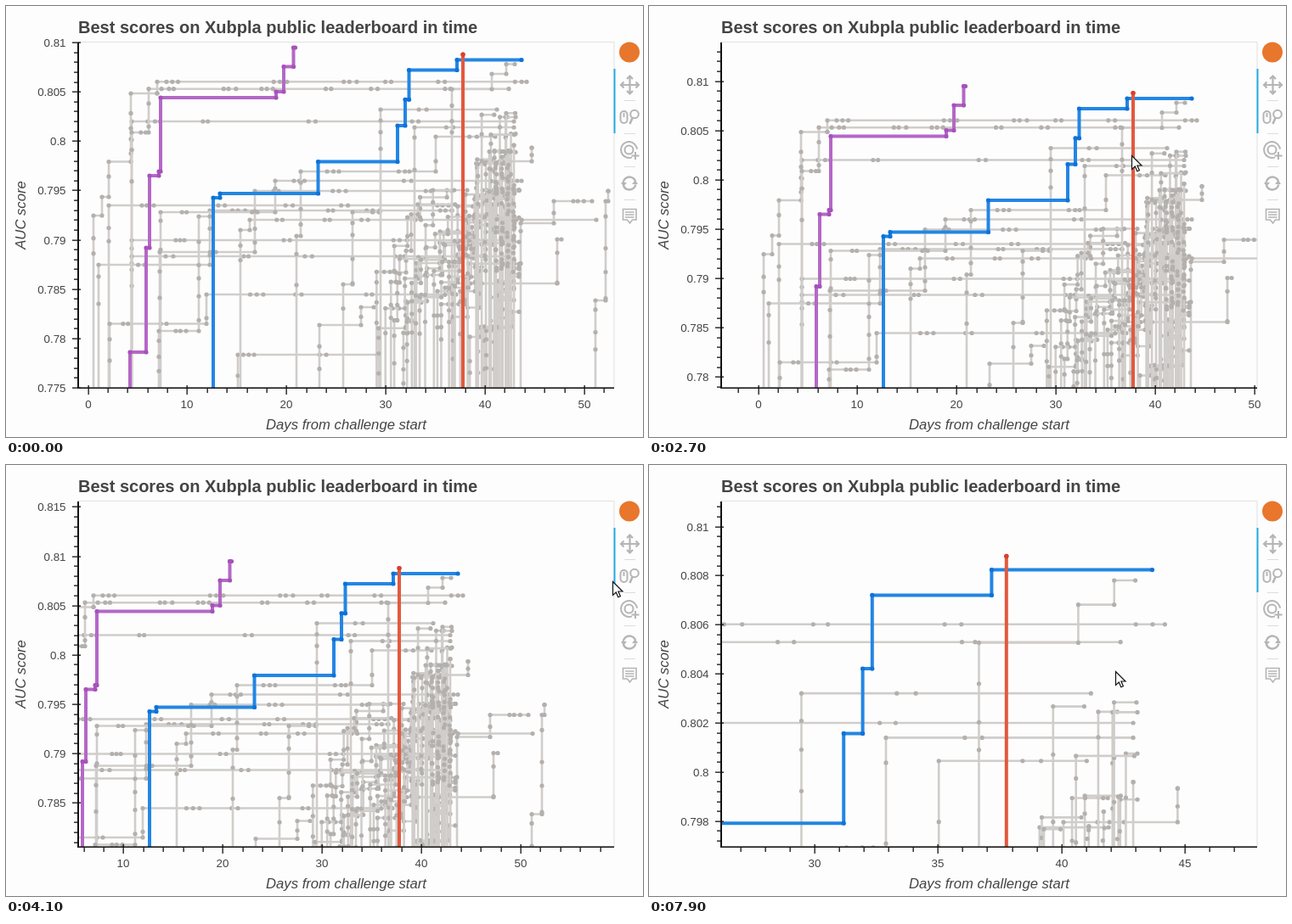
These frames come from a looping animation (750 px wide and 508 px high, 8 s). An HTML page with a canvas:

```html
<!DOCTYPE html>
<html lang="en">
<head>
<meta charset="utf-8">
<title>Leaderboard scores</title>
<style>
html, body { margin: 0; width: 100%; height: 100%; overflow: hidden; background: #fdfdfd; }
canvas { display: block; }
</style>
</head>
<body>
<canvas id="stage" width="750" height="508"></canvas>
<script>
const ctx = document.getElementById('stage').getContext('2d');
const LOOP = 8000, STEP = 100;
const BOX = { l: 85, t: 43, r: 716, b: 450 };
const DAY = 11.69, DAY0 = 96.5, SCORE = 11628, TOP = 0.81;
const PAPER = '#fdfdfd', INK = '#444', AXIS = '#111', ICON = '#b6b4b4', BAR = '#26aae1';
const GREY = { line: '#d0cdca', dot: '#b3b0ad', width: 2.6, r: 2.6 };
const FONT = '"Liberation Sans", Arial, sans-serif';

let seed = 41;
function rnd(a = 0, b = 1) {
  seed = (seed * 1664525 + 1013904223) % 4294967296;
  return a + (b - a) * seed / 4294967296;
}

// A curve is a list of stair tops [x, y] in unzoomed pixels; it runs flat from each to the next.
const curves = [];

function stairs(style, end, ...tops) {
  const dots = [];
  tops.forEach(([x, y], i) => {
    dots.push([x, y]);
    if (i) dots.push([x, tops[i - 1][1]]);
  });
  dots.push([end, tops[tops.length - 1][1]]);
  const curve = { ...style, end, tops, dots };
  curves.push(curve);
  return curve;
}

// A grey curve also gets seeded clusters of dots on its flats and tall risers
function team(end, ...tops) {
  const { dots } = stairs(GREY, end, ...tops);
  tops.forEach(([x, y], i) => {
    const stop = i + 1 < tops.length ? tops[i + 1][0] : end;
    const below = i ? tops[i - 1][1] : Math.min(450, y + 60);
    for (let at = x + rnd(5, 60); at < stop - 8; at += rnd(40, 130)) {
      for (let n = rnd(1, 3), p = at; n > 0 && p < stop; n--, p += rnd(5, 9)) dots.push([p, y]);
    }
    for (let at = y + rnd(8, 30); at < below; at += rnd(12, 40)) dots.push([x, at]);
  });
}

// Long flat runs
[136, 235, 276, 295].forEach((y, i) => team(598 - 8 * (i % 2), [i === 1 ? 121 : 148, y]));

// Early starters
team(613, [103, 247], [113, 225], [121, 183.5], [147, 103], [178, 89.3]);
team(592, [148, 149], [168, 97.7]);
team(525, [109, 305], [240, 241]);
team(530, [122, 374.5], [236, 340]);
team(607, [182, 243], [317, 206]);
team(525, [181, 290], [293, 218]);
team(240, [180, 383], [227, 248]);

// Middle of the contest
team(576, [342, 271], [347, 195], [506, 154]);
team(437, [273, 411]);
team(695, [276, 264], [287, 252]);
team(433, [369, 376], [418, 355]);
team(440, [397, 328], [408, 243]);
team(578, [441, 122]);
team(598, [481, 143]);

// Late finishers
team(599, [525, 98], [572, 80], [589, 68.5]);
team(619, [565, 183], [619, 167]);
team(690, [606, 256], [645, 230]);
team(654, [526, 327], [649, 275]);
team(709, [694, 347], [706, 230], [709, 218]);

// Small climbers crowding the last weeks
for (let i = 0; i < 26; i++) {
  let x = 432 + 6 * i + rnd(0, 6), y = rnd(290, 390);
  const tops = [[x, y]];
  for (let n = 0; n < 4 && x < 590; n++) {
    x = Math.min(598, x + rnd(2, 34));
    y = Math.max(y - rnd(8, 48), 217);
    tops.push([x, y]);
  }
  team(Math.min(604, x + rnd(4, 45)), ...tops);
}
for (let i = 0; i < 12; i++) {
  const x = rnd(550, 596), y = rnd(125, 200);
  team(Math.min(600, x + rnd(4, 40)), [x, y]);
}
for (let x = 577; x < 602; x += 7) {
  const { dots } = stairs(GREY, x, [x, 185 - (x - 577)]);
  for (let n = 0; n < 20; n++) dots.push([x + rnd(-1, 1), rnd(185, 315)]);
}

const bold = (line, dot) => ({ line, dot, width: 4, r: 2.6 });
stairs(bold('#b468c6', '#a652ba'), 340.5, [146, 408], [165, 285], [169, 200], [180, 195],
  [182, 108], [318, 101], [327, 71.5], [338.5, 49]);
stairs(bold('#2386e4', '#0f72d8'), 607, [244, 226], [252, 221], [367.5, 183.5], [461, 141],
  [470, 110.3], [474.5, 75.5], [531, 63.5]);
stairs(bold('#e2593f', '#d8402c'), 538, [538, 57]);

// Keyframes: time, x, y
const smooth = u => u * u * (3 - 2 * u);
function along(keys, t) {
  let i = 0;
  while (i < keys.length - 1 && keys[i + 1][0] <= t) i++;
  const a = keys[i], b = keys[i + 1];
  if (!b || t < a[0]) return [a[1], a[2]];
  const u = smooth((t - a[0]) / (b[0] - a[0]));
  return [a[1] + (b[1] - a[1]) * u, a[2] + (b[2] - a[2]) * u];
}
const POINTER = [[400, 765, 190], [1000, 733, 95], [1500, 733, 95], [1900, 536, 127], [2300, 573, 183],
  [3100, 563, 168], [3700, 461, 203], [4100, 714, 137], [4400, 733, 131], [4800, 733, 131],
  [5500, 511, 200], [6800, 511, 200], [7250, 517, 141], [7900, 549, 243]];
const DRAG = [[1900, 0, 0], [2300, 37.5, 61], [3100, 26.5, 30], [3700, -75, 64.5]];
const DRAG2 = [[7300, 0, 0], [7900, 30, 102]];
const ZOOMS = [5800, 6200, 6600, 6900, 7100], PIVOT = [511.5, 199.5];

function viewAt(t) {
  const k = Math.pow(1.2, ZOOMS.filter(z => t >= z).length);
  const d = along(DRAG, t), e = along(DRAG2, t);
  const off = i => PIVOT[i] + k * (d[i] - PIVOT[i]) + e[i];
  return { k, x: off(0), y: off(1) };
}

function plot(v, c) {
  const px = x => x * v.k + v.x, py = y => y * v.k + v.y;
  ctx.strokeStyle = c.line;
  ctx.lineWidth = c.width;
  ctx.beginPath();
  let y0 = 2500;
  for (const [x, y] of c.tops) {
    if (y0 === 2500) ctx.moveTo(px(x), y0);
    else ctx.lineTo(px(x), y0);
    ctx.lineTo(px(x), y0 = py(y));
  }
  ctx.lineTo(px(c.end), y0);
  ctx.stroke();
  ctx.fillStyle = c.dot;
  for (const [x, y] of c.dots) disc(px(x), py(y), c.r);
}

function disc(x, y, r) {
  ctx.beginPath();
  ctx.arc(x, y, r, 0, 7);
  ctx.fill();
}

function text(s, x, y, font, align) {
  ctx.font = font + ' ' + FONT;
  ctx.textAlign = align;
  ctx.fillStyle = INK;
  ctx.fillText(s, x, y);
}

function interval(range) {
  const p = Math.pow(10, Math.floor(Math.log10(range / 6)));
  const miss = s => Math.abs(range / s - 6);
  return [1, 2, 5, 10].map(m => m * p).reduce((a, b) => miss(b) < miss(a) ? b : a);
}

// Calls mark(position, value, isMajor) for every tick between lo and hi
function ticks(lo, hi, toPx, mark) {
  const minor = interval(hi - lo) / 5;
  for (let i = Math.ceil(lo / minor - 0.01); i * minor <= hi + minor * 0.01; i++) {
    mark(Math.round(toPx(i * minor)), i * minor, i % 5 === 0);
  }
}

function axes(v) {
  const dayPx = DAY * v.k, scorePx = SCORE * v.k;
  const zeroX = DAY0 * v.k + v.x, topY = BOX.t * v.k + v.y;
  const bar = (x, y, w, h) => {
    ctx.fillStyle = AXIS;
    ctx.fillRect(x, y, w, h);
  };
  bar(BOX.l - 1, BOX.t, 2, BOX.b - BOX.t + 1);
  bar(BOX.l, BOX.b - 0.5, BOX.r - BOX.l, 1.5);
  ticks((BOX.l - zeroX) / dayPx, (BOX.r - zeroX) / dayPx, d => zeroX + d * dayPx, (x, d, major) => {
    bar(x - 0.5, major ? 447 : 450, 1.3, major ? 11 : 6);
    if (major) text(String(Math.round(d)), x, 474, '13.33px', 'center');
  });
  const score = y => TOP - (y - topY) / scorePx;
  ticks(score(BOX.b), score(BOX.t), s => topY + (TOP - s) * scorePx, (y, s, major) => {
    bar(major ? 78 : 80, y - 0.5, major ? 10 : 5, 1.3);
    if (major) text(String(+s.toFixed(4)), 70.5, y + 5, '13.33px', 'right');
  });
}

function line(width, path) {
  ctx.lineWidth = width;
  ctx.stroke(new Path2D(path));
}
function ring(x, y, r, from = 0, to = 7) {
  ctx.beginPath();
  ctx.arc(x, y, r, from, to);
  ctx.stroke();
}

function toolbar(hover, panOn) {
  if (hover) {
    ctx.fillStyle = '#f0f0f0';
    ctx.fillRect(717, hover, 33, 38);
  }
  ctx.fillStyle = BAR;
  if (panOn) ctx.fillRect(715.5, 74, 2, 38);
  ctx.fillRect(715.5, 112, 2, 38);
  ctx.fillStyle = '#e8762c';
  disc(734, 54.5, 12);

  ctx.strokeStyle = '#dcdcdc';
  for (let i = 0; i < 4; i++) line(1, `M728 ${111.5 + 39 * i}h13`);

  ctx.strokeStyle = ctx.fillStyle = ICON;
  // pan: one arrow turned four ways
  for (let i = 0; i < 4; i++) {
    ctx.save();
    ctx.translate(734.5, 93);
    ctx.rotate(i * Math.PI / 2);
    line(2.2, 'M0 0H10M7-3.5L10.5 0L7 3.5');
    ctx.restore();
  }
  // wheel zoom
  line(2, 'M723.5 128a4 4 0 0 1 8 0v6a4 4 0 0 1-8 0zM727.5 126v5');
  ring(740, 127.5, 4.8);
  line(2.6, 'M737.5 132L734.5 139');
  // box zoom
  ctx.lineWidth = 2;
  ring(733.5, 169.5, 9.5, 1.2, 6.2);
  ring(733.5, 169.5, 5);
  line(2, 'M741 172v9M736.5 176.5h9');
  // reset
  ctx.lineWidth = 2.4;
  ring(734, 209, 7.5, 3.3, 5.9);
  ring(734, 209, 7.5, 0.2, 2.8);
  ctx.fill(new Path2D('M724 208h7l-4 5zM744 210h-7l4-5z'));
  // hover
  line(1.6, 'M726.5 239.5H742V252h-4.5l-3 4l-3-4h-5zM729 243h10.5M729 246h10.5M729 249h10.5');
}

const ARROW = new Path2D('M.5 .5V16.5L4.3 13L6.8 18.8L9.4 17.7L6.9 12H12Z');
const HAND = new Path2D('M-1.5 2Q0 -.5 1.5 2V8Q3 6.5 4.5 8.3Q6.3 7.2 7.5 9Q10 8.5 10 11V15L8 21H0L-4.5 14.5Q-7 11.5-5.5 10.5Q-4 10-1.5 13Z');
function cursor(x, y, shape) {
  ctx.save();
  ctx.translate(Math.round(x), Math.round(y));
  ctx.fillStyle = '#fff';
  ctx.strokeStyle = '#111';
  ctx.lineWidth = 1.2;
  ctx.fill(shape);
  ctx.stroke(shape);
  ctx.restore();
}

function draw(t) {
  const v = viewAt(t), [px, py] = along(POINTER, t);
  ctx.fillStyle = PAPER;
  ctx.fillRect(0, 0, 750, 508);
  ctx.strokeStyle = '#e6e6e6';
  ctx.lineWidth = 1.3;
  ctx.strokeRect(BOX.l, BOX.t - 0.5, BOX.r - BOX.l, BOX.b - BOX.t);

  ctx.save();
  ctx.beginPath();
  ctx.rect(BOX.l, BOX.t, BOX.r - BOX.l, BOX.b - BOX.t);
  ctx.clip();
  for (const c of curves) plot(v, c);
  ctx.restore();

  axes(v);
  text('Best scores on Xubpla public leaderboard in time', 85, 32, 'bold 20px', 'left');
  text('Days from challenge start', 400.5, 499, 'italic 16.67px', 'center');
  ctx.save();
  ctx.translate(23, 246.5);
  ctx.rotate(-Math.PI / 2);
  text('AUC score', 0, 0, 'italic 16.67px', 'center');
  ctx.restore();

  const onBar = px > 718 && px < 750;
  const hover = onBar && py >= 74 && py < 150 ? (py < 112 ? 74 : 112) : 0;
  toolbar(hover, t < 1100 || t >= 1400);
  cursor(px, py, onBar ? HAND : ARROW);
}

let last = -1;
function tick(now) {
  const t = Math.floor((now % LOOP) / STEP) * STEP;
  if (t !== last) draw(last = t);
  requestAnimationFrame(tick);
}
draw(0);
requestAnimationFrame(tick);
</script>
</body>
</html>
```
